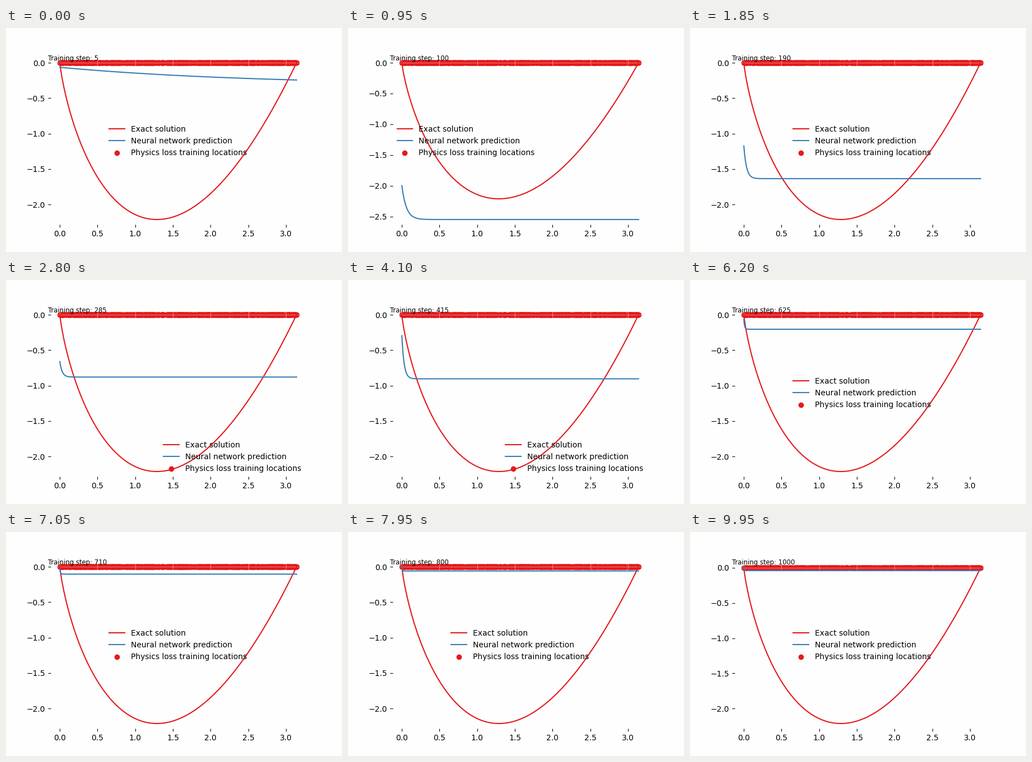
A matplotlib script that plays this animation: 600 px wide and 400 px high, repeating every 10000 ms.

```python
import numpy as np
import matplotlib.pyplot as plt
from matplotlib.animation import FuncAnimation

RED, BLUE = "#e41a1c", "#377eb8"
PAPER = "#fefefe"
FRAMES, INTERVAL = 200, 50

# training steps at which the fit changes its behaviour
FIRST, DIP, SHELF, RELEASE = 5, 100, 270, 415

plt.rcParams.update({
    "font.family": "DejaVu Sans",
    "font.size": 10,
    "xtick.direction": "in",
    "ytick.direction": "in",
})


def exact(x):
    x = np.maximum(x, 1e-9)
    return x * (1.3826 * np.log(x / np.pi) + 0.262 * (x - np.pi))


def blend(a, b, u):
    return a + (b - a) * u


def part(step, begin, end):
    return min(max((step - begin) / (end - begin), 0), 1)


def start_value(step):
    if step <= DIP:
        u = part(step, FIRST, DIP)
        return blend(-0.065, -2.0, np.sin(np.pi / 2 * u))
    return 0.026 - 2.03 * np.exp(-(step - DIP) / 171)


def plateau(step):
    if step <= DIP:
        u = part(step, FIRST, DIP)
        return blend(-0.32, -2.55, np.sin(np.pi / 2 * u))
    if step <= SHELF:
        u = part(step, DIP, SHELF)
        return blend(-2.55, -0.877, (1 - np.cos(np.pi * u)) / 2)
    if step <= RELEASE:
        return blend(-0.877, -0.905, part(step, SHELF, RELEASE))
    return -0.036 - 0.869 * np.exp(-((step - RELEASE) / 143.5) ** 1.294)


def decay_length(step):
    if step <= DIP:
        u = part(step, FIRST, DIP)
        return 0.06 * (2.6 / 0.06) ** ((1 - u) ** 2)
    early = 1 + np.exp(-(step - DIP) / 50)
    late = np.exp(-max(0, step - RELEASE) / 191)
    return 0.03 * early * late


def legend_place(low, level):
    if low < -2.4:
        return "center left"
    if -1.38 < level < -0.842:
        return "lower right"
    return "center"


x = np.linspace(0, np.pi, 500)
truth = exact(x)
rng = np.random.default_rng(4)
spots = np.concatenate(([0, np.pi], rng.uniform(0, np.pi, 800)))

fig, ax = plt.subplots(figsize=(6, 4), dpi=100, facecolor=PAPER)
ax.set_facecolor(PAPER)
for spine in ax.spines.values():
    spine.set_visible(False)
ax.grid(True, color="white", alpha=0.4, linewidth=0.8)

ax.plot(x, truth, color=RED, lw=1.5, label="Exact solution")
guess, = ax.plot(x, 0 * x, color=BLUE, lw=1.5,
                 label="Neural network prediction")
ax.scatter(spots, 0 * spots, color=RED,
           label="Physics loss training locations")
pad = 0.05 * np.pi
ax.set_xlim(-pad, np.pi + pad)
caption = ax.text(0, 1, "", transform=ax.transAxes, va="top",
                  fontsize="small")
legend = ax.legend(loc="center", frameon=False)


def update(i):
    step = 5 * (i + 1)
    level = plateau(step)
    fade = np.exp(-x / decay_length(step))
    y = blend(level, start_value(step), fade)
    guess.set_ydata(y)

    low = min(truth.min(), y.min())
    high = max(0, y.max())
    margin = 0.05 * (high - low)
    ax.set_ylim(low - margin, high + margin)

    legend.set_loc(legend_place(low, level))
    caption.set_text(f"Training step: {step}")
    return guess, caption, legend


anim = FuncAnimation(fig, update, frames=FRAMES, interval=INTERVAL,
                     repeat=True, repeat_delay=0)
plt.show()
```
